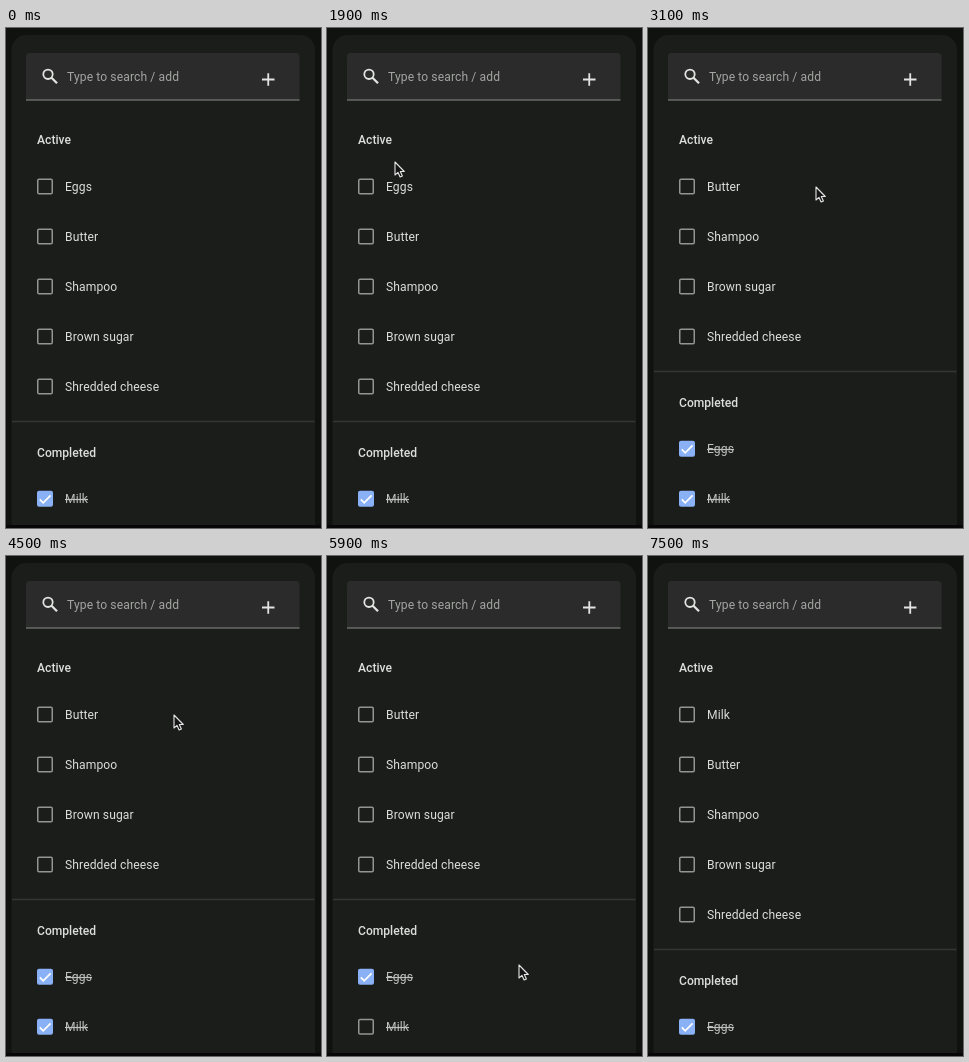
Animation, 315 px wide and 500 px high, one loop 7900 ms. Source, as an HTML page:

```html
<!DOCTYPE html>
<html lang="en">
<head>
<meta charset="utf-8">
<title>Shopping list</title>
<style>
  html, body { margin: 0; width: 100%; height: 100%; overflow: hidden; background: #101210; }
  svg { display: block; width: 315px; height: 500px; }
  text { font: 400 12.1px Roboto, Arial, sans-serif; letter-spacing: .11px; fill: #dcdedc; }
  .heading { font-weight: 500; letter-spacing: 0; }
  .hint { fill: #a3a5a3; }
  .done { fill: #bfc1bf; text-decoration: line-through; }
  .box { fill: none; stroke: #939593; stroke-width: 1.5; }
  .checked { fill: #8ab0f5; stroke: #8ab0f5; }
  .tick { fill: none; stroke: #fff; stroke-width: 1.7; }
  .pointer { fill: #141514; stroke: #e6e6e6; stroke-width: 1.1; stroke-linejoin: round; }
</style>
</head>
<body>
<svg viewBox="0 0 315 500">
  <rect width="315" height="500" fill="#101210"/>
  <rect id="card" x="5.5" y="7" width="303.5" rx="15" fill="#1b1d1b"/>
  <path d="M20 72V28.500q0-3.500 3.500-3.500H290q3.500 0 3.500 3.500V72z" fill="#2a2b2a"/>
  <path d="M20 72H293.500" stroke="#8b8d8b"/>
  <g fill="none" stroke="#e2e4e2">
    <circle cx="42" cy="46.300" r="4.700" stroke-width="1.800"/>
    <path d="M45.500 49.800L51 55.300" stroke-width="2.300"/>
    <path d="M256 51.500H268.500M262.250 45.300V57.700" stroke-width="1.800"/>
  </g>
  <text class="hint" x="61" y="52.700">Type to search / add</text>
  <g id="list"></g>
  <rect y="497" width="315" height="3" fill="#060706"/>
  <path id="arrow" class="pointer" d="M0 0V13L3 10.400L5.100 15L7.400 14L5.300 9.500H9.300Z"/>
  <path id="hand" class="pointer" d="M-1.500 7V1Q-1.500-.500 0-.500T1.500 1V5Q3-.0 4.200 5.200Q5.800 4.500 6 6.200Q7.300 6 7.300 7.500V10Q7 12 5.800 14.500H-.8Q-2-12 -1 12Q-2.800 10.500-4.500 8Q-4.500 6-2.600 6.700Z"/>
</svg>
<script>
const LOOP = 7900, STEP = 200, FIRST = 100;
const ROW = 50, TOP_ROW = 158.5;
const REST = ["Butter", "Shampoo", "Brown sugar", "Shredded cheese"];
const $ = id => document.getElementById(id);

// Clean single-outline hand, fingertip at the origin.
$("hand").setAttribute("d",
  "M-1.4 8V.9Q-1.4-.5 0-.5T1.4.9V5Q2.800 4 4 5.400Q5.200 4.800 5.900 6.200" +
  "Q7 6.200 7 7.600V10Q6.800 12 5.700 14.500H-.600Q-1.400 12.500-3.900 9Q-4.500 7-3 7.200Z");

// Pointer stops: time, x, y
const STOPS = [
  [1300, -16, 205], [1500, 2, 188], [1700, 44, 154], [1900, 68, 134],
  [2100, 45, 162], [2700, 45, 162], [3100, 168, 159],
  [4700, 168, 159], [5300, 50, 452], [5500, 37, 475], [5700, 37, 475],
  [5900, 192, 409], [6100, 207, 399], [7100, 207, 399]
];

const smooth = k => k * k * (3 - 2 * k);

function pointerAt(t) {
  const i = STOPS.findIndex(stop => stop[0] > t);
  if (i < 1) return null;
  const [t0, x0, y0] = STOPS[i - 1], [t1, x1, y1] = STOPS[i];
  const k = smooth((t - t0) / (t1 - t0));
  return [x0 + (x1 - x0) * k, y0 + (y1 - y0) * k];
}

function stateAt(t) {
  if (t >= 2700 && t < 2900) return { empty: true };
  const hoverEggs = t >= 2100 && t < 2700, hoverMilk = t >= 5500 && t < 5900;
  if (t < 2700) return {
    active: ["Eggs", ...REST], completed: ["Milk"],
    hover: hoverEggs && "Eggs", toggled: t >= 2500 && "Eggs"
  };
  if (t < 6100) return {
    active: REST, completed: ["Eggs", "Milk"],
    hover: hoverMilk && "Milk", toggled: t >= 5700 && "Milk"
  };
  return { active: ["Milk", ...REST], completed: ["Eggs"] };
}

const heading = (label, y) => `<text class="heading" x="31" y="${y + 4}">${label}</text>`;

function item(label, y, done, state) {
  const checked = done !== (state.toggled === label);
  const glow = state.hover === label ? `<circle cx="39" cy="${y}" r="17" fill="#292b2b"/>` : "";
  const tick = checked ? `<path class="tick" d="M33.800 ${y + .6}l3.400 3.400l7.400-7.500"/>` : "";
  return `${glow}<rect class="box ${checked ? "checked" : ""}" x="31.75" y="${y - 7.25}"
    width="14.5" height="14.5" rx="1.3"/>${tick}
    <text class="${done ? "done" : ""}" x="59" y="${y + 4.4}">${label}</text>`;
}

function listMarkup(state) {
  if (state.empty) return "";
  const rows = (labels, top, done) =>
    labels.map((label, i) => item(label, top + i * ROW, done, state)).join("");
  const divider = TOP_ROW + state.active.length * ROW - 15;
  return heading("Active", 112) + rows(state.active, TOP_ROW, false) +
    `<path d="M6 ${divider}H308.500" stroke="#343634" stroke-width="1.4"/>` +
    heading("Completed", divider + 31) + rows(state.completed, divider + 77.3, true);
}

let shown = "";
function draw(t) {
  const state = stateAt(t);
  const markup = listMarkup(state);
  if (markup !== shown) $("list").innerHTML = shown = markup;
  $("card").setAttribute("height", state.empty ? 83 : 520);

  const spot = pointerAt(t);
  for (const id of ["arrow", "hand"]) {
    const visible = spot && (id === "hand") === Boolean(state.hover);
    $(id).setAttribute("visibility", visible ? "visible" : "hidden");
    if (spot) $(id).setAttribute("transform", `translate(${spot[0]} ${spot[1]})`);
  }
}

function tick() {
  const t = performance.now() % LOOP;
  draw(t < FIRST ? 0 : FIRST + Math.floor((t - FIRST) / STEP) * STEP);
  requestAnimationFrame(tick);
}
draw(0);
requestAnimationFrame(tick);
</script>
</body>
</html>
```
